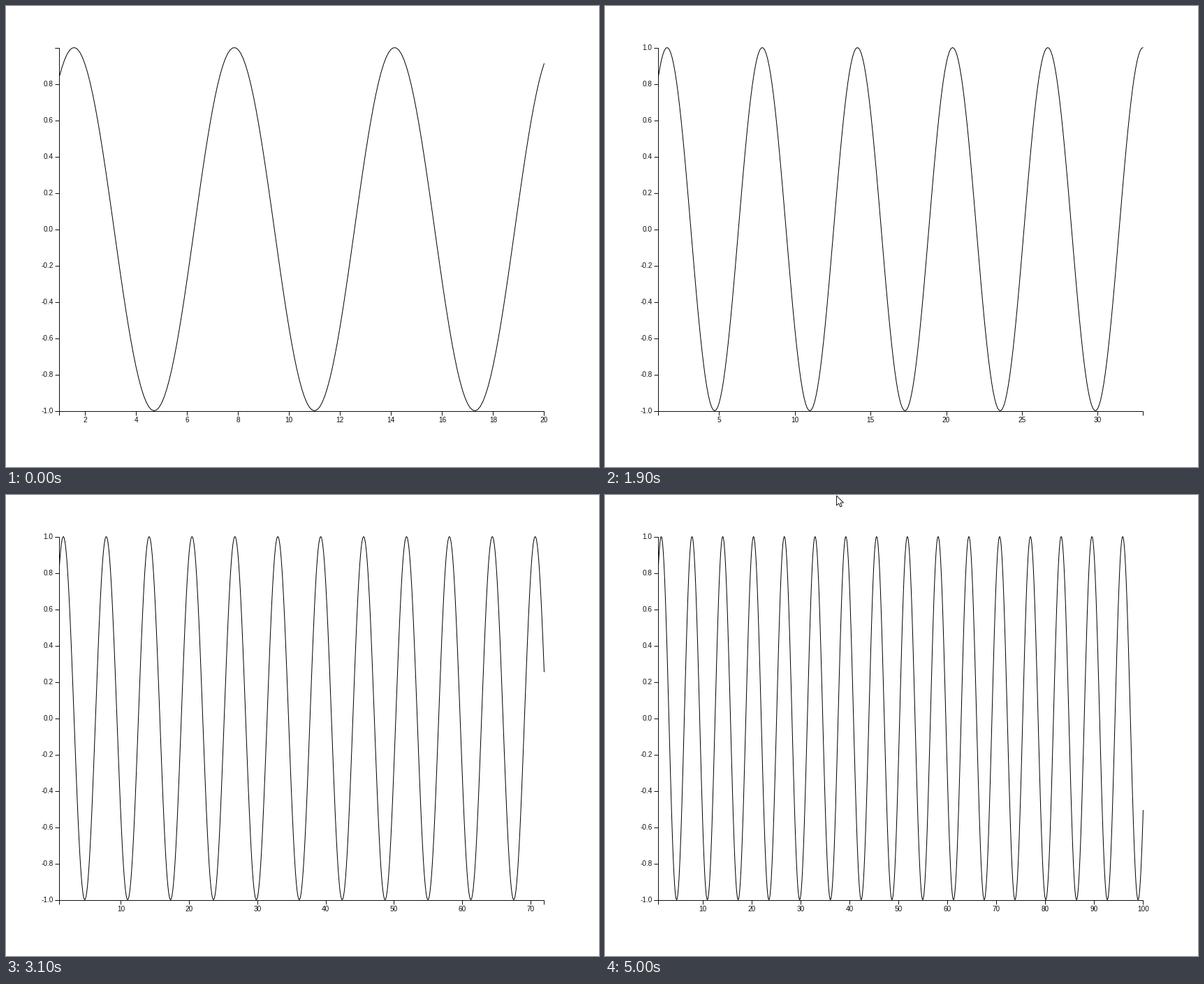
A matplotlib script for the animation above (5100 ms loop, 849 px wide and 660 px high).

```python
import numpy as np
import matplotlib.pyplot as plt
from matplotlib.animation import FuncAnimation
from matplotlib.collections import LineCollection
from matplotlib.patches import Polygon

W, H, DPI = 849, 660, 100
LEFT, RIGHT, TOP, BOTTOM = 76.5, 770.5, 59.5, 579.5
FRAMES, STEP_MS = 51, 100
INK = "#111111"
PX = 72 / DPI  # points per pixel

plt.rcParams["font.family"] = "Liberation Sans"
plt.rcParams["path.simplify"] = False

fig = plt.figure(figsize=(W / DPI, H / DPI), dpi=DPI, facecolor="white")
ax = fig.add_axes([0, 0, 1, 1])
ax.set_xlim(0, W)
ax.set_ylim(H, 0)
ax.axis("off")


def y_pos(v):
    return BOTTOM - (v + 1) / 2 * (BOTTOM - TOP)


def label(x, y, text, ha):
    return ax.text(x, y, text, ha=ha, va="baseline", fontsize=10 * PX, color=INK)


def rule(xs, ys):
    ax.plot(xs, ys, color=INK, lw=PX, snap=True, solid_capstyle="butt",
            solid_joinstyle="miter")


# Axis domains with their end ticks
rule([LEFT - 6, LEFT, LEFT, LEFT - 6], [TOP, TOP, BOTTOM, BOTTOM])
rule([LEFT, LEFT, RIGHT, RIGHT], [BOTTOM + 6, BOTTOM, BOTTOM, BOTTOM + 6])

y_labels = []
for k in range(-5, 6):
    y = y_pos(k / 5)
    rule([LEFT - 6, LEFT], [y, y])
    y_labels.append(label(LEFT - 9, y + 3.2, f"{k / 5:.1f}", "right"))

x_ticks = LineCollection([], colors=INK, linewidths=PX, snap=True)
ax.add_collection(x_ticks)
x_labels = [label(0, BOTTOM + 16.2, "", "center") for _ in range(16)]

curve, = ax.plot([], [], color="black", lw=PX, solid_joinstyle="round",
                 solid_capstyle="butt")

ARROW = np.array([(0, 0), (0, 14), (3.2, 11), (5.4, 16), (7.6, 15),
                  (5.5, 10.2), (10, 10)]) + 0.5
pointer = Polygon(ARROW, closed=True, fc="white", ec="#222222", lw=PX, zorder=5)
ax.add_patch(pointer)


def x_end(t):
    """Upper end of the x domain, growing by whole units."""
    return round(float(np.interp(t, [1400, 1500, 2300, 3100, 3500, 3900],
                                 [20, 21, 45, 72, 88, 100])))


def tick_step(span):
    """Round 1-2-5 step that gives about ten ticks."""
    step = 10 ** np.floor(np.log10(span / 10))
    err = 10 / span * step
    for limit, factor in ((0.15, 10), (0.35, 5), (0.75, 2)):
        if err <= limit:
            return int(step * factor)
    return int(step)


def pointer_pos(u):
    """Curved sweep from the lower right to the top edge."""
    a, b, c = np.array([(698, 579), (-60, 250), (331, 0.5)])
    return (1 - u) ** 2 * a + 2 * u * (1 - u) * b + u ** 2 * c


def draw(i):
    t = i * STEP_MS
    end = x_end(t)
    scale = (RIGHT - LEFT) / (end - 1)

    xs = np.linspace(1, end, (end - 1) * 10 + 1)
    ys = np.sin(xs)
    curve.set_data(LEFT + (xs - 1) * scale, y_pos(ys))
    # The top label shows once a sample rounds to exactly one
    y_labels[-1].set_visible(bool(np.round(ys.max(), 4) >= 1))

    step = tick_step(end - 1)
    ticks = range(step, end + 1, step)
    places = [LEFT + (v - 1) * scale for v in ticks]
    x_ticks.set_segments([[(x, BOTTOM), (x, BOTTOM + 6)] for x in places])
    for text in x_labels:
        text.set_text("")
    for text, v, x in zip(x_labels, ticks, places):
        text.set_text(str(v))
        text.set_x(x)

    pointer.set_visible(t >= 4600)
    if t >= 4600:
        pointer.set_xy(ARROW + pointer_pos((t - 4600) / 400))
    return []


anim = FuncAnimation(fig, draw, frames=FRAMES, interval=STEP_MS,
                     repeat=True, repeat_delay=0, blit=False)
plt.show()
```
